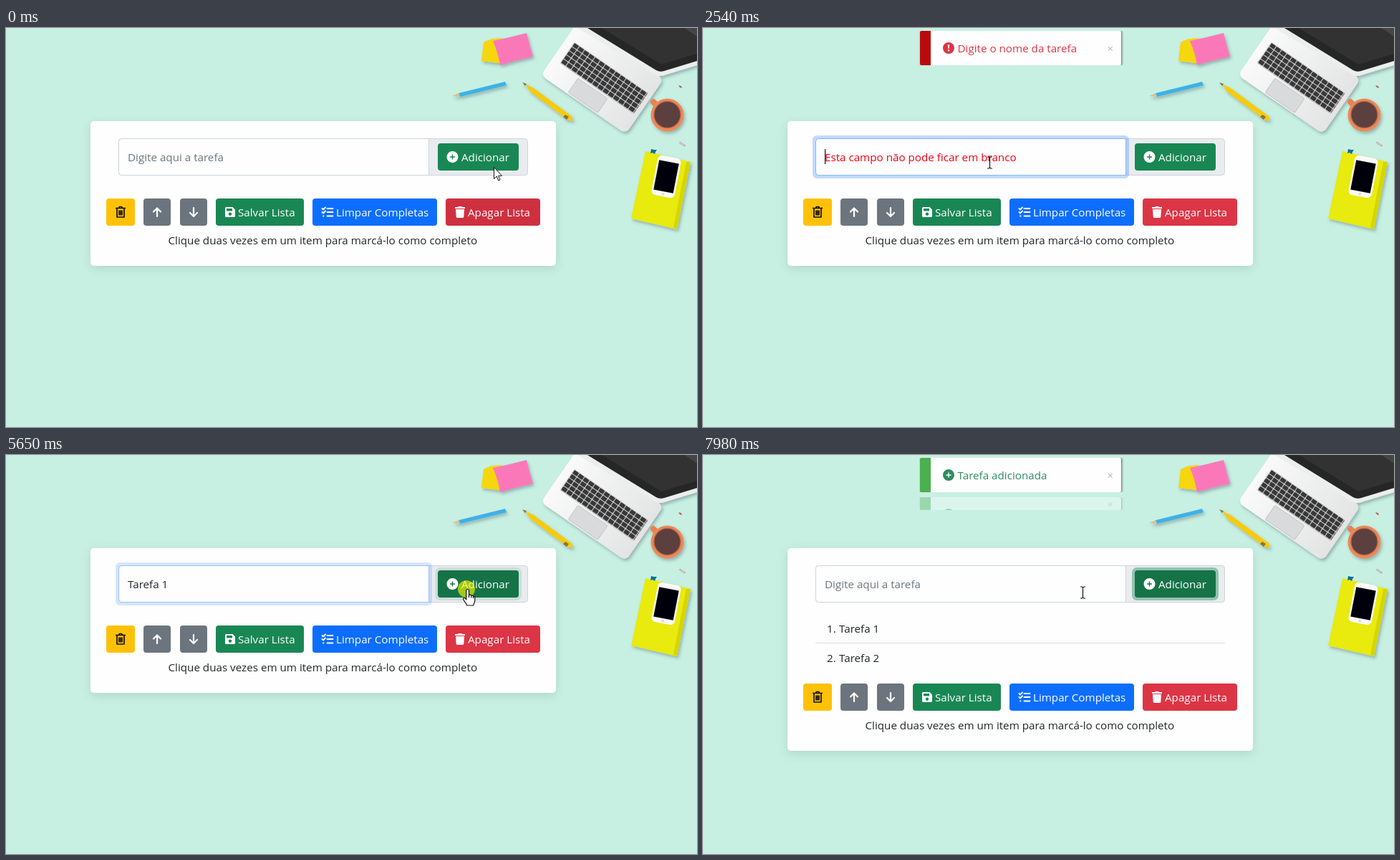
An HTML page that plays this animation: 965 by 557 pixels, repeating every 8 s.

```html
<!DOCTYPE html>
<html lang="pt-BR">
<head>
<meta charset="utf-8">
<title>Lista de tarefas</title>
<style>
html, body { margin: 0; width: 100%; height: 100%; overflow: hidden; background: #c7f0e2; }
#stage { position: absolute; left: 0; top: 0; width: 965px; height: 557px; overflow: hidden; }
#stage > svg { position: absolute; left: 0; top: 0; display: block; }
text, .toast { font: 15.2px "Open Sans", "Noto Sans", sans-serif; }
text { fill: #212529; white-space: pre; }
.btn text, .btn .ico { fill: #fff; }
.ico { fill-rule: evenodd; }
.line { fill: none; stroke: #fff; stroke-width: 2.2; stroke-linecap: round; stroke-linejoin: round; }
.toast {
  position: absolute; left: 303px; width: 281px; box-sizing: border-box; background: #fefefe;
  border-left: 15px solid; border-radius: 2px; overflow: hidden;
  box-shadow: 1px 0 3px rgba(0,0,0,.6); clip-path: inset(0 -6px);
}
.toast svg { position: absolute; left: 0; top: 0; }
.toast b { position: absolute; right: 11px; top: 50%; height: 20px; margin-top: -10px; font-weight: 400; font-size: 15px; line-height: 20px; color: #c3b5cf; }
</style>
</head>
<body>
<div id="stage">
<svg width="965" height="557" viewBox="0 0 965 557">
  <defs>
    <pattern id="keys" width="8.8" height="6.9" patternUnits="userSpaceOnUse" x="13" y="-64">
      <rect width="7.8" height="5.9" rx="1" fill="#383838"/>
    </pattern>
    <linearGradient id="metal" x1="0" x2="1">
      <stop offset="0" stop-color="#fafafa"/><stop offset="1" stop-color="#e3e4e4"/>
    </linearGradient>
    <filter id="soft" x="-20%" y="-20%" width="140%" height="150%">
      <feDropShadow dx="2" dy="3" stdDeviation="2" flood-color="#345" flood-opacity=".35"/>
    </filter>
    <filter id="cardShade" x="-10%" y="-20%" width="120%" height="150%">
      <feDropShadow dx="0" dy="4" stdDeviation="7" flood-color="#000" flood-opacity=".11"/>
    </filter>
    <path id="plus" class="ico" d="M-8 0a8 8 0 1 0 16 0a8 8 0 1 0-16 0zM-.7-3.5h1.4v2.8h2.8v1.4h-2.8v2.8h-1.4v-2.8h-2.8v-1.4h2.8z"/>
    <path id="alert" class="ico" d="M-8 0a8 8 0 1 0 16 0a8 8 0 1 0-16 0zM-1.2-4.8h2.4l-.4 5.6h-1.6zM-1.1 2.2h2.2v2.2h-2.2z"/>
  </defs>

  <!-- desk -->
  <g filter="url(#soft)">
    <path d="M664 46L667 20Q676 14 692 14L704 46 688 49Z" fill="#f6d60f"/>
    <path d="M680 18Q704 13 727 7Q731 24 736 40Q712 45 690 52Q687 34 680 18Z" fill="#fb78b8"/>
    <path d="M632 91L697 75 699 80 634 96Z" fill="#3eb2e6"/>
    <path d="M623 95L632 91 634 96Z" fill="#e3bd8c"/>
    <path d="M725 78L737 84 790 123 792 130 784 128 732 89Z" fill="#f6cb0c"/>
    <path d="M721 76L727 78 725 81ZM781 121L786 124 783 128 778 124Z" fill="#8a7432"/>
  </g>
  <g filter="url(#soft)">
    <g transform="translate(747 66) rotate(34.6)">
      <rect y="-93" width="144" height="93" rx="8" fill="url(#metal)"/>
      <rect x="12" y="-65" width="126" height="36" rx="2" fill="#d2d2d2"/>
      <rect x="13" y="-64" width="124" height="34.5" fill="url(#keys)"/>
      <rect x="45" y="-26" width="50" height="24" rx="2" fill="#d9dadb" stroke="#c6c7c8"/>
    </g>
    <path d="M798 0L908 66Q913 68 919 66L965 52V0Z" fill="#eceded"/>
    <path d="M812 0L908 59Q913 62 919 60L965 46V0Z" fill="#262626"/>
    <path d="M832 0L915 51 965 36V12L947 0Z" fill="#303030"/>
    <path d="M947 0L965 12V0Z" fill="#444"/>
  </g>
  <g filter="url(#soft)">
    <path d="M912 111L904 103" stroke="#e9804f" stroke-width="8" stroke-linecap="round"/>
    <circle cx="923.5" cy="121.5" r="23" fill="#ea8a58"/>
    <circle cx="923.5" cy="121" r="19.5" fill="#c9694a"/>
    <circle cx="923.5" cy="121" r="18" fill="#5b4140"/>
  </g>
  <g filter="url(#soft)">
    <path d="M893 172L956 187 937 281 873 266Z" fill="#e9ea0a"/>
    <path d="M950 187L956 187 937 281 932 279Z" fill="#d6d500"/>
    <g transform="translate(922 207.500) rotate(11)">
      <rect x="-16.500" y="-28" width="33" height="56" rx="6" fill="#fafafa"/>
      <rect x="-14" y="-21" width="28" height="42" fill="#060608"/>
      <circle cy="24.500" r="2" fill="#ddd"/>
    </g>
  </g>
  <path d="M901 169l4 1 4 0-2 3-1 3-3-2-3 1z" fill="#13708f"/>
  <path d="M939 80l4 1 1 3-3-1z" fill="#c45a4e"/>
  <path d="M941 159l8 5-2 1-6-4z" fill="none" stroke="#c99b9b"/>

  <!-- card -->
  <rect id="card" x="118" y="130" width="650" height="202" rx="5" fill="#fefefe" filter="url(#cardShade)"/>
  <rect x="157.500" y="154.500" width="571" height="51" rx="4" fill="#e9ecef" stroke="#ced4da"/>
  <rect id="glow" x="153" y="150" width="442" height="60" rx="6" fill="#0d6efd"/>
  <path id="field" d="M161.500 154.500H590.500V205.500H161.500Q157.500 205.500 157.500 201.500V158.500Q157.500 154.500 161.500 154.500Z" fill="#fefefe"/>
  <text id="value" x="170" y="186"></text>
  <rect id="caret" y="169" width="1.200" height="21" fill="#111"/>

  <g class="btn">
    <rect id="ring" x="599" y="157" width="121" height="46" rx="7" fill="#3c996e"/>
    <rect id="add" x="603" y="161" width="113" height="38" rx="4"/>
    <use href="#plus" x="623.500" y="180" fill="#fff"/>
    <text x="636" y="186">Adicionar</text>
  </g>

  <g id="item1"><text x="173" y="248">1.</text><text x="190" y="248">Tarefa 1</text></g>
  <g id="item2">
    <path d="M157 262.500H729" stroke="#dcdddd"/>
    <text x="173" y="289">2.</text><text x="190" y="289">Tarefa 2</text>
  </g>

  <g id="tools" class="btn">
    <rect x="140" y="238" width="40" height="38" rx="4" fill="#ffc107"/>
    <path d="M153 251.500H167M157.500 251L158.500 249.500H161.500L162.500 251M155 252V264H165V252M158 254.500V261.500M160 254.500V261.500M162 254.500V261.500" fill="none" stroke="#15130a" stroke-width="1.700" stroke-linejoin="round"/>
    <rect x="192" y="238" width="38" height="38" rx="4" fill="#6c757d"/>
    <path class="line" d="M211 263V252M206 256.500L211 251.500 216 256.500"/>
    <rect x="243" y="238" width="38" height="38" rx="4" fill="#6c757d"/>
    <path class="line" d="M262 251V262M257 258L262 263 267 258"/>
    <rect x="293" y="238" width="123" height="38" rx="4" fill="#198754"/>
    <path class="ico" d="M307.500 250H316.500L320 253.500V262.500Q320 264 318.500 264H307.500Q306 264 306 262.500V251.500Q306 250 307.500 250ZM308 252V255.500H316V252ZM313 257.500a2.200 2.200 0 1 0 .01 0Z"/>
    <text x="324" y="263">Salvar Lista</text>
    <rect x="428" y="238" width="174" height="38" rx="4" fill="#0d6efd"/>
    <path class="line" style="stroke-width:1.800" d="M448.500 252H456.500M448.500 257H456.500M448.500 262.500H456.500M441.500 252L443 253.500 446 250.500M441.500 257L443 258.500 446 255.500M443 262.500H443.500"/>
    <text x="461" y="263">Limpar Completas</text>
    <rect id="clear" x="614" y="238" width="132" height="38" rx="4"/>
    <path class="ico" d="M627 250H631L632 249H636L637 250H641V252H627ZM628 253H640L639.300 263.500Q639.200 265 637.700 265H630.300Q628.800 265 628.700 263.500Z"/>
    <text x="645" y="263">Apagar Lista</text>
    <text x="226.500" y="302" style="fill:#212529">Clique duas vezes em um item para marcá-lo como completo</text>
  </g>

  <!-- pointer -->
  <g id="mouse">
    <circle id="press" cx="-1.500" cy="-.5" r="12" fill="#fcfa00" fill-opacity=".62"/>
    <path id="arrow" d="M.5.5V16.500L4.300 13 6.800 19 9 18 6.600 12.300H11.500Z" fill="#fff" stroke="#111"/>
    <g id="hand" fill="#fff" stroke="#111" stroke-width="1.200" stroke-linejoin="round">
      <path d="M-1.700 1.500C-1.700-.5 2-.5 2 1.500V8C3 7 5.200 7.500 5.200 9C6.200 8.200 7.900 8.700 8 10C9.200 9.500 10.300 10.300 10.300 12V16C10.300 18 8.300 20 8.300 22.500H-1C-1 20-4 17.500-5.700 14.500C-6.700 12.300-4.700 11-3.200 12.500L-1.700 14.500Z"/>
      <path d="M2 8V11.500M5.200 9V12M8 10V12.500"/>
    </g>
    <path id="beam" d="M-3-7.500H-1L.5-6.500 2-7.500H4M-3 8.500H-1L.5 7.500 2 8.500H4M.5-6.500V7.500" fill="none" stroke="#111" stroke-width="1.200"/>
  </g>
</svg>
</div>
<script>
const LOOP = 8000, FADE = 150, SLIDE = 400;
const $ = id => document.getElementById(id);
const set = (id, attrs) => { for (const k in attrs) $(id).setAttribute(k, attrs[k]); };
const show = (id, on) => { $(id).style.display = on ? '' : 'none'; };
const clamp = v => Math.max(0, Math.min(1, v));
const swing = p => 0.5 - Math.cos(Math.PI * clamp(p)) / 2;
const mix = (a, b, p) => `rgb(${a.map((v, i) => Math.round(v + (b[i] - v) * p))})`;

// spans are [start, end]; the level fades at both ends
const level = (spans, t) => spans.reduce((s, [a, b]) => s + clamp((t - a) / FADE) - clamp((t - b) / FADE), 0);
const within = (spans, t) => spans.find(([a, b]) => t >= a && t < b);
const latest = (steps, t) => steps.filter(s => s[0] <= t).pop();

const HOVER = [[60, 1850], [5355, 5890], [7552, 7875]];
const INPUT_FOCUS = [[930, 5600], [6110, 7790]];
const BUTTON_FOCUS = [[790, 930], [5600, 6110], [7790, 9000]];
const PRESS = [[790, 940], [2390, 2540], [5580, 5730], [6110, 6200], [7780, 7890]];
const CARET = [[930, 1460, 170], [1990, 3000, 170], [3530, 3600, 209], [3600, 4130, 216],
  [4590, 5000, 225], [6110, 6570, 170], [6570, 6900, 216], [6900, 7240, 225]];

const HINT = ['Digite aqui a tarefa', '#6c757d'];
const typed = s => [s, '#212529'];
const VALUE = [
  [0, ...HINT],
  [930, 'Esta campo não pode ficar em branco', '#ee0015'],
  [3530, ...typed('Taref')], [3600, ...typed('Tarefa ')], [4590, ...typed('Tarefa 1')],
  [5790, ...HINT],
  [6570, ...typed('Tarefa ')], [6900, ...typed('Tarefa 2')],
  [7930, ...HINT]
];

// start, end, x, y
const MOVES = [[0, 0, 681, 194], [60, 390, 668, 182], [1650, 2250, 400, 187.5], [5000, 5480, 644.5, 187.5],
  [5800, 6080, 467.5, 178.5], [7240, 7650, 625.5, 183.5], [7860, 7975, 530, 191.5]];

const TOASTS = [
  { from: 930, until: 3830, top: 4, bar: '#b90b0d', ink: '#dc3545', icon: 'alert', text: 'Digite o nome da tarefa' },
  { from: 5756, until: 9000, top: 4, bar: '#4caf50', ink: '#2f8d61', icon: 'plus', text: 'Tarefa adicionada' },
  { from: 7815, until: 9000, top: 59, bar: '#4caf50', ink: '#2f8d61', icon: 'plus', text: 'Tarefa adicionada' }
];
for (const n of TOASTS) {
  n.el = document.createElement('div');
  n.el.className = 'toast';
  n.el.style.borderLeftColor = n.bar;
  n.el.innerHTML = `<svg width="250" height="48"><use href="#${n.icon}" x="25" y="24" fill="${n.ink}"/>
    <text x="37.500" y="30" style="fill:${n.ink}">${n.text}</text></svg><b>×</b>`;
  $('stage').append(n.el);
}

function pointer(t) {
  let [, , x, y] = MOVES[0];
  for (const [a, b, tx, ty] of MOVES.slice(1)) {
    const p = swing((t - a) / (b - a));
    x += (tx - x) * p;
    y += (ty - y) * p;
  }
  return [x, y];
}

function render(t) {
  const items = t >= 7930 ? 2 : t >= 5790 ? 1 : 0;
  const shift = [0, 40, 81][items];
  set('card', { height: 202 + shift });
  set('tools', { transform: `translate(0 ${shift})` });
  show('item1', items > 0);
  show('item2', items > 1);

  const focus = level(INPUT_FOCUS, t);
  set('glow', { opacity: 0.25 * focus });
  set('field', { stroke: mix([206, 212, 218], [134, 183, 254], focus) });
  const [, text, ink] = latest(VALUE, t);
  $('value').textContent = text;
  $('value').style.fill = ink;
  const caret = within(CARET, t);
  show('caret', caret);
  if (caret) set('caret', { x: caret[2] });

  const ring = level(BUTTON_FOCUS, t);
  set('ring', { opacity: 0.5 * ring });
  set('add', { fill: mix([25, 135, 84], [21, 115, 71], Math.max(ring, level(HOVER, t))) });
  set('clear', { fill: mix([207, 48, 64], [220, 53, 69], clamp(t / 80)) });

  const [x, y] = pointer(t);
  const shape = t < 60 ? 'arrow' : x < 591 ? 'beam' : x < 603 ? 'arrow' : 'hand';
  set('mouse', { transform: `translate(${x.toFixed(1)} ${y.toFixed(1)})` });
  for (const s of ['arrow', 'beam', 'hand']) show(s, s === shape);
  show('press', within(PRESS, t));

  for (const n of TOASTS) {
    const s = swing((t - n.from) / SLIDE) - swing((t - n.until) / SLIDE);
    Object.assign(n.el.style, {
      display: s > 0.01 ? '' : 'none',
      opacity: s,
      height: 48 * s + 'px',
      top: n.top - 4 * (n.top < 10 ? 1 - s : 0) + 'px'
    });
  }
}

const start = performance.now();
function tick(now) {
  render(Math.max(0, now - start) % LOOP);
  requestAnimationFrame(tick);
}
render(0);
requestAnimationFrame(tick);
</script>
</body>
</html>
```
